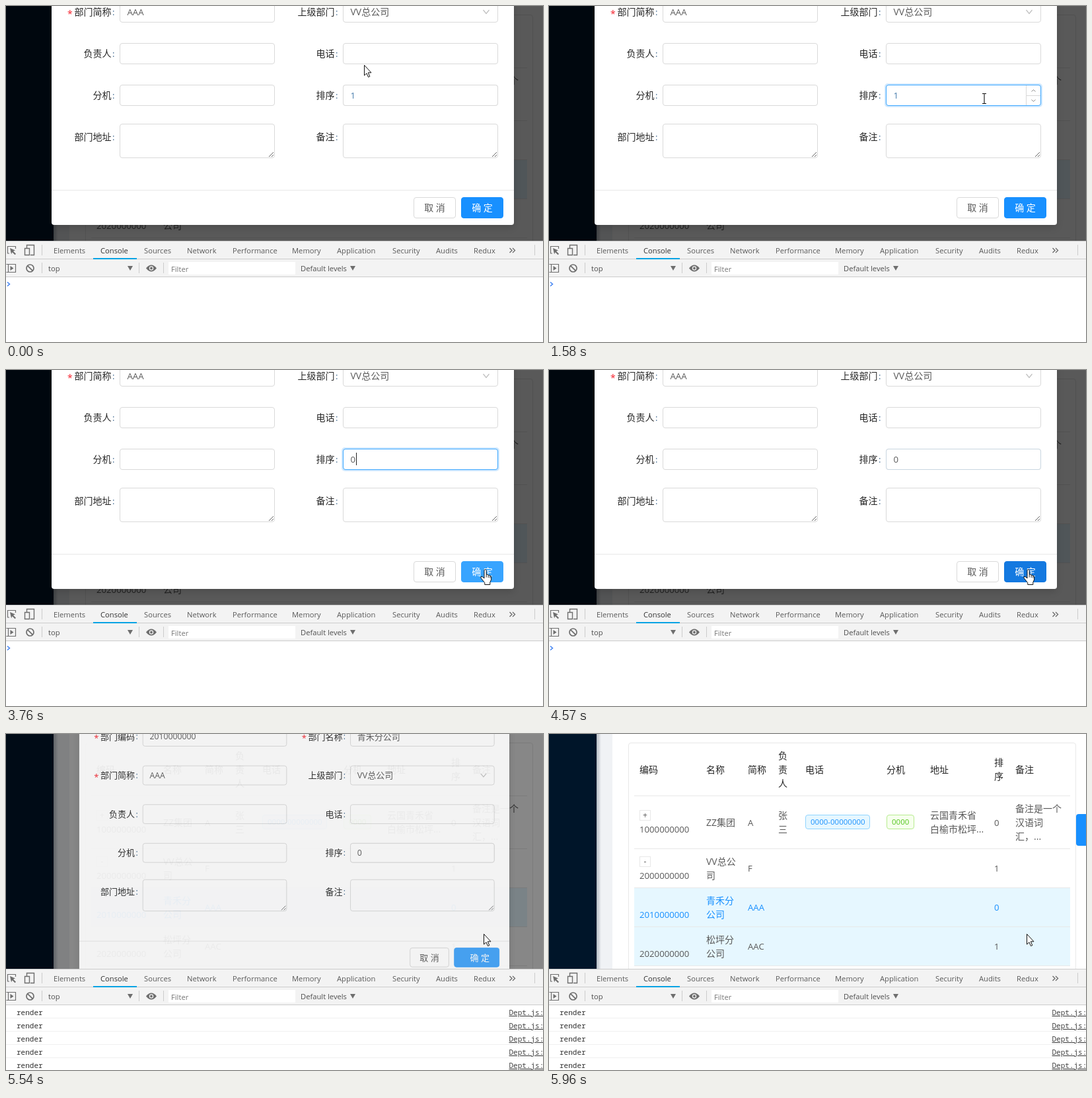
An HTML page that plays this animation: 813 by 508 pixels, repeating every 8000 ms.

```html
<!DOCTYPE html>
<html lang="zh">
<head>
<meta charset="utf-8">
<title>部门表单</title>
<style>
html, body { margin: 0; width: 100%; height: 100%; overflow: hidden; background: #fff; }
svg { display: block; width: 813px; height: 508px; font-family: "Open Sans", "Noto Sans CJK SC", "Noto Sans CJK", sans-serif; }
.mono { font-family: "Noto Sans Mono", "DejaVu Sans Mono", monospace; }
</style>
</head>
<body>
<svg id="stage" viewBox="0 0 813 508"></svg>
<script>
const LOOP = 8000;
const DARK = '#262626', BODY = '#595959', BLUE = '#1890ff', LINE = '#e8e8e8', ICON = '#6e6e6e';

// Each step overrides part of the state from its time onward.
const STEPS = [
  [0, { cursor: ['arrow', 542, 89], value: '1', tint: '#4b7fae', border: '#d9d9d9', glow: 0, caret: 0,
        arrows: 0, split: 135, ok: BLUE, lines: 0, loading: 0, ripple: 0, okLeft: 689,
        mask: .65, modal: 1, matrix: '', hover: 0 }],
  [430, { cursor: ['arrow', 552, 103] }],
  [550, { cursor: ['beam', 566, 127], border: '#9fd0f9' }],
  [670, { cursor: ['beam', 580, 135], border: '#40a9ff', arrows: .6 }],
  [820, { cursor: ['beam', 592, 138], glow: .3, caret: 1, arrows: 1 }],
  [940, { glow: .6 }],
  [1070, { glow: .85 }],
  [1190, { glow: 1 }],
  [1340, { cursor: ['beam', 606, 138], caret: 0 }],
  [1460, { cursor: ['beam', 634, 139] }],
  [1580, { cursor: ['beam', 659, 140] }],
  [1740, { cursor: ['beam', 690, 143] }],
  [1890, { cursor: ['beam', 722, 147] }],
  [2040, { cursor: ['hand', 730, 147], split: 134, caret: 1 }],
  [2160, { split: 132 }],
  [2600, { value: '0', tint: BODY }],
  [2720, { cursor: ['denied', 737, 150] }],
  [3150, { cursor: ['arrow', 736, 153] }],
  [3300, { cursor: ['arrow', 733, 206], caret: 0, arrows: .5, split: 134 }],
  [3450, { cursor: ['arrow', 729, 258], arrows: 0 }],
  [3610, { cursor: ['arrow', 725, 290], ok: '#2898ff' }],
  [3760, { cursor: ['hand', 718, 301], caret: 1, ok: '#38a4ff' }],
  [3880, { ok: '#40a9ff' }],
  [4300, { caret: 0, glow: .6 }],
  [4430, { glow: .25, border: '#8cc6f5' }],
  [4570, { glow: 0, border: '#c9d6e0', ok: '#1479e0' }],
  [4970, { value: '1', border: '#d9d9d9', lines: 1, ok: '#3b9df8' }],
  [5120, { cursor: ['arrow', 723, 302], loading: 1, ripple: .12, okLeft: 667, ok: '#84c6ff' }],
  [5270, { lines: 3, ripple: .08 }],
  [5390, { lines: 4, ripple: .04 }],
  [5540, { value: '0', lines: 5, loading: 0, ripple: 0, okLeft: 679, ok: '#3fa3fb', mask: .47,
           modal: .9, matrix: 'matrix(.93 0 0 .93 46.8 54.2)' }],
  [5690, { mask: 0, modal: 0 }],
  [5960, { hover: 1 }]
];

const text = (x, y, s, fill = BODY, size = /^[ -~]*$/.test(s) ? 13.2 : 14, extra = '') =>
  `<text x="${x}" y="${y + size * .36}" fill="${fill}" font-size="${size}" ${extra}>${s}</text>`;
const column = (x, y, rows, fill) => rows.map((s, i) => text(x, y + i * 21, s, fill)).join('');
const box = (x, y, w, h, fill, r = 0, extra = '') =>
  `<rect x="${x}" y="${y}" width="${w}" height="${h}" rx="${r}" fill="${fill}" ${extra}/>`;
const frame = (x, y, w, h, stroke = '#d9d9d9', fill = '#fff', r = 3.5) =>
  box(x + .5, y + .5, w - 1, h - 1, fill, r, `stroke="${stroke}"`);
const path = (d, stroke, width = 1, fill = 'none', extra = '') =>
  `<path d="${d}" stroke="${stroke}" stroke-width="${width}" fill="${fill}" ${extra}/>`;
const hline = (x, y, w, fill = LINE) => box(x, y, w, 1, fill);

function page(s) {
  const row = (y, code, name, short, rank, fill = BODY) =>
    text(137, y + 11, code, fill) + column(238, y - 10, name, fill) +
    text(301, y, short, fill) + text(674, y, rank, fill);
  const toggle = (y, sign) => frame(137, y, 17, 16, LINE, '#fff', 0) +
    text(145.5, y + 7.5, sign, BODY, 12, 'text-anchor="middle"');
  const tag = (x, w, s, fill, stroke, ink) => frame(x, 122, w, 22, stroke, fill) + text(x + 8, 133, s, ink, 11.5);
  const heads = [[137, '编码'], [238, '名称'], [301, '简称'], [388, '电话'], [511, '分机'], [577, '地址'], [706, '备注']];
  return box(0, 0, 813, 355, '#fff') + box(72, 0, 24, 355, '#f0f2f5') +
    box(72, 0, 7, 355, 'url(#edge)') + box(0, 0, 72, 355, '#001529') +
    frame(120, 13, 678, 400, LINE) +
    box(129, 233, 660, 58, '#e6f7ff') + (s.hover ? box(129, 292, 660, 58, '#e6f7ff') : '') +
    [93, 173, 232, 291, 350].map(y => hline(129, y, 660)).join('') +
    heads.map(([x, s]) => text(x, 54, s, DARK)).join('') +
    column(347, 33, ['负', '责', '人'], DARK) + column(674, 43, ['排', '序'], DARK) +
    toggle(115, '+') + text(137, 144, '1000000000') + text(238, 134, 'ZZ集团') + text(301, 134, 'A') +
    column(347, 123, ['张', '三']) +
    tag(388, 98, '0000-00000000', '#e6f7ff', '#91d5ff', BLUE) +
    tag(511, 42, '0000', '#f6ffed', '#b7eb8f', '#52c41a') +
    column(577, 123, ['云国青禾省', '白榆市松坪...']) + text(674, 134, '0') +
    column(706, 113, ['备注是一个', '汉语词', '汇，...']) +
    toggle(185, '-') + row(203, '2000000000', ['VV总公', '司'], 'F', '1') +
    row(262, '2010000000', ['青禾分', '公司'], 'AAA', '0', BLUE) +
    row(321, '2020000000', ['松坪分', '公司'], 'AAC', '1') +
    (s.mask ? '' : box(798, 121, 20, 48, BLUE, 4));
}

function numberInput(s) {
  const chevron = (y, d, ink) => path(`M730.5 ${y}l3 ${d}l3 ${-d}`, ink);
  return (s.glow ? box(508, 117, 239, 36, BLUE, 5, `opacity="${.2 * s.glow}"`) : '') +
    frame(510, 119, 235, 32, s.border) +
    `<g opacity="${s.arrows}">` + box(722, 120, 1, 30, '#d9d9d9') + hline(722, s.split, 22, '#d9d9d9') +
    chevron(s.split - 5.5, -3, '#8c8c8c') +
    chevron((s.split + 151) / 2 - 1.5, 3, s.value === '0' ? '#cfcfcf' : '#8c8c8c') + '</g>' +
    text(521.5, 135, s.value, s.tint) + (s.caret ? box(530, 125, 1, 19, '#222') : '');
}

function modal(s) {
  const field = (x, y, label, value = '', star = false, area = false) => {
    const h = area ? 52 : 32, top = area ? y - 20 : y - 16, r = x + 235;
    return text(x - 12.5, y, label, DARK, 14, 'text-anchor="end"') + text(x - 11, y, ':', '#35618a', 13.2) +
      (star ? text(x - 79, y + 3, '*', '#f5222d', 14) : '') + frame(x, top, 235, h) + text(x + 11.5, y, value) +
      (area ? path(`M${r - 9} ${top + h - 2}l7 -7M${r - 5} ${top + h - 2}l3 -3`, '#666') : '');
  };
  const button = (x, w, fill, stroke, label, ink) => frame(x, 289, w, 32, stroke, fill) +
    text(x + w - 32, 305, label, ink, 14, 'text-anchor="middle"');
  return `<g opacity="${s.modal}" transform="${s.matrix}">` +
    box(69, -160, 700, 491, '#fff', 4, 'filter="url(#shadow)"') +
    field(172, -54, '部门编码', '2010000000', true) + field(510, -54, '部门名称', '青禾分公司', true) +
    field(172, 9, '部门简称', 'AAA', true) + field(510, 9, '上级部门', 'VV总公司') +
    path('M722.5 6l4.5 5.5l4.5 -5.5', '#bfbfbf', 1.2) +
    field(172, 72, '负责人') + field(510, 72, '电话') + field(172, 135, '分机') + field(510, 135, '排序') +
    numberInput(s) +
    field(172, 198, '部门地址', '', false, true) + field(510, 198, '备注', '', false, true) +
    hline(69, 278, 700) +
    button(s.okLeft - 72, 64, '#fff', '#d9d9d9', '取 消', BODY) +
    (s.ripple ? box(s.okLeft - 5, 284, 96, 42, BLUE, 7, `opacity="${s.ripple}"`) : '') +
    button(s.okLeft, 753 - s.okLeft, s.ok, s.ok, '确 定', '#fff') +
    (s.loading ? path('M683.5 305.5a6 6 0 0 0 7.5 6', '#fff', 1.3) : '') + '</g>';
}

function devtools(s) {
  const tabs = [[72, 'Elements'], [143, 'Console'], [209, 'Sources'], [274, 'Network'], [343, 'Performance'], [433, 'Memory'],
    [501, 'Application'], [585, 'Security'], [651, 'Audits'], [708, 'Redux']];
  const small = (x, y, s, ink = '#4f4f4f') => text(x, y, s, ink, 11.2);
  const down = x => path(`M${x} 393h8l-4 7z`, 'none', 0, ICON);
  const split = (x, y) => box(x, y, 1, 16, '#ccc');
  const rows = Array.from({ length: s.lines }, (_, i) => {
    const y = 421 + i * 20;
    return text(16, y, 'render', '#303030', 11, 'class="mono"') +
      text(761.5, y, 'Dept.js:145', '#444', 11, 'class="mono" text-decoration="underline"') +
      hline(0, y + 8, 813, '#f0f0f0');
  }).join('');
  const prompt = 420 + s.lines * 20;
  return box(0, 355, 813, 153, '#fff') + box(0, 355, 813, 54, '#f3f3f3') +
    [355, 382, 409].map(y => hline(0, y, 813, '#ccc')).join('') +
    tabs.map(([x, s]) => small(x, 370, s, s === 'Console' ? '#333' : '#5a5a5a')).join('') +
    box(132, 381, 66, 2, '#03a3e4') +
    path('M5 374H2.5V363.5H14.5V367', ICON, 1.2) + path('M6 366l8 3.5l-3 1.2l4 4l-1.5 1.5l-4 -4l-1.5 3z', 'none', 0, ICON) +
    path('M31.5 366V361.5H42.5V376.5H37M28.5 366.5H35.5V376.5H28.5z', ICON, 1.4) +
    path('M762.5 366l3.5 3.5l-3.5 3.5M767 366l3.5 3.5l-3.5 3.5', ICON, 1.4) +
    split(54, 361) + split(800, 361) +
    path('M.5 390.5H14.5V402.5H.5M3.5 390V403', ICON, 1.2) + path('M6.5 393l5 3.5l-5 3.5z', 'none', 0, ICON) +
    `<circle cx="36.5" cy="396.5" r="5.5" fill="none" stroke="${ICON}" stroke-width="1.7"/>` +
    path('M32.8 392.8l7.4 7.4', ICON, 1.7) +
    split(54, 388) + small(64, 397, 'top') + down(184) + split(201, 388) +
    path('M212 396.5q8 -10 16 0q-8 10 -16 0z', 'none', 0, ICON) +
    '<circle cx="220" cy="396.5" r="3.2" fill="#f3f3f3"/>' + `<circle cx="220" cy="396.5" r="1.9" fill="${ICON}"/>` +
    split(238, 388) + box(246, 387, 192, 19, '#fff') + small(250, 398, 'Filter', '#777') +
    small(446, 397, 'Default levels') + down(521) + rows +
    path(`M2 ${prompt - 2.5}l3.5 3l-3.5 3`, '#367cf1', 1.4);
}

const CURSORS = {
  arrow: path('M.5 .5V16L4 12.8L6.5 18.5L8.8 17.5L6.3 11.8H11z', '#111', 1, '#fff'),
  beam: path('M-3 -7.5h2.5l.5 .5l.5 -.5h2.5M0 -7V7M-3 7.5h2.5l.5 -.5l.5 .5h2.5', '#111', 1.1),
  hand: path('M6 14V2.3Q6 .6 7.6 .6T9.2 2.3V8.3Q12 7.4 12.2 9.3Q14.6 8.5 14.8 10.4Q16.6 10 16.6 12V16L14.8 20V23.5H6.8V20.8L1.2 13.7Q.2 11.4 2 11.2Q3.6 11.2 6 14z', '#111', 1, '#fff') +
    path('M9.2 8.5V12.5M12.2 9.5V13M14.8 10.5V13.5', '#111', .9),
  denied: ['#fff', '#111'].map((ink, i) =>
    path('M-8 0a8 8 0 1 0 16 0a8 8 0 1 0 -16 0M-5.5 -5.5L5.5 5.5', ink, 4 - 2 * i)).join('')
};

const DEFS = `<defs>
  <linearGradient id="edge"><stop stop-color="#001529" stop-opacity=".25"/><stop offset="1" stop-color="#001529" stop-opacity="0"/></linearGradient>
  <filter id="shadow" x="-5%" y="-5%" width="110%" height="115%"><feDropShadow dx="0" dy="4" stdDeviation="6" flood-opacity=".15"/></filter>
</defs>`;

function scene(s) {
  const [kind, x, y] = s.cursor;
  return DEFS + page(s) + (s.mask ? box(0, 0, 813, 355, '#000', 0, `opacity="${s.mask}"`) : '') +
    (s.modal ? modal(s) : '') + devtools(s) +
    `<g transform="translate(${x} ${y})">${CURSORS[kind]}</g>`;
}

const stage = document.getElementById('stage');
let shown = 0;
function tick() {
  const time = performance.now() % LOOP;
  const past = STEPS.filter(([at]) => at <= time);
  if (past.length !== shown) {
    shown = past.length;
    stage.innerHTML = scene(Object.assign({}, ...past.map(([, change]) => change)));
  }
  requestAnimationFrame(tick);
}
tick();
</script>
</body>
</html>
```
